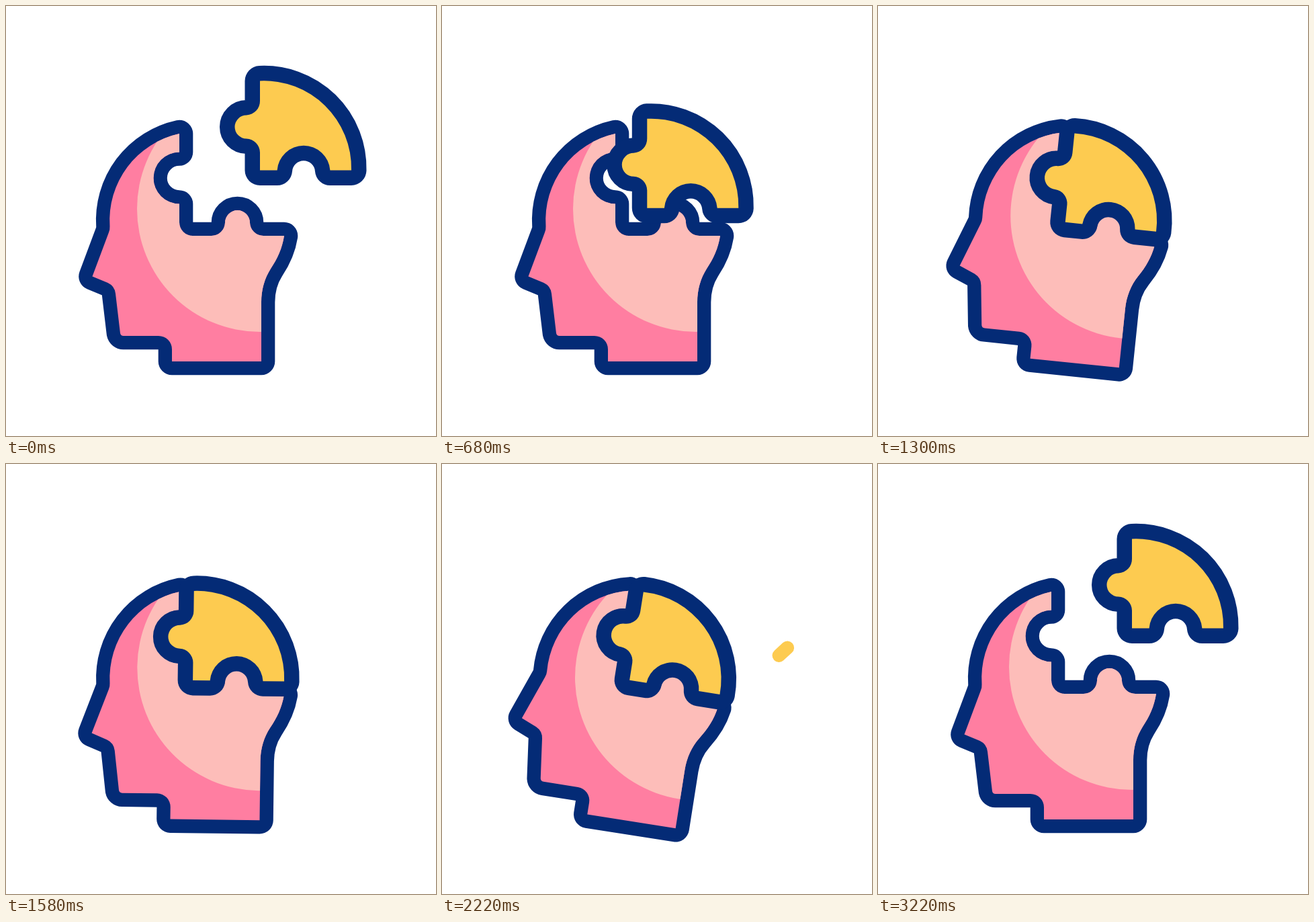
Animation of 640 by 640 pixels, one loop 3.6 s. Source, as an HTML page with a canvas:

```html
<!DOCTYPE html>
<html lang="en">
<head>
<meta charset="utf-8">
<title>Puzzle head</title>
<style>
  html, body { margin: 0; width: 100%; height: 100%; overflow: hidden; background: #fff; }
  canvas { display: block; width: 640px; height: 640px; }
</style>
</head>
<body>
<canvas id="stage" width="640" height="640"></canvas>
<script>
const ctx = document.getElementById('stage').getContext('2d');
const LOOP = 3600;
const NAVY = '#042b76', ROSE = '#ff7ea1', BLUSH = '#fdbdb9', GOLD = '#fdcb50';
const PIVOT = { x: 279, y: 329 };
const DOCK = { x: -100, y: 77.4 };

// Arc commands: turn(r, x, y) runs clockwise, back(r, x, y) counterclockwise.
const turn = (r, x, y) => `A${r} ${r} 0 0 1 ${x} ${y}`;
const back = (r, x, y) => `A${r} ${r} 0 0 0 ${x} ${y}`;

// Paths trace the coloured area; the navy border grows outwards from them.
const head = new Path2D(['M258 190 V217.5', back(38.5, 258, 294.5),
  'V322', back(20, 278, 342), 'H306', back(20, 326, 322.5),
  turn(18.5, 363, 322.5), back(20, 383, 342),
  'H414 C411 361 404 376 394 391 C385 405 380 422 380 441 V529 H247 V511',
  back(20, 227, 491), 'H175', turn(5, 170, 487), 'L163 428',
  back(20, 151.5, 412), 'L128.5 402.5 L153 337', back(20, 154.5, 328),
  turn(132, 258, 190), 'Z'].join(' '));

const piece = new Path2D(['M378 111.5 V141', turn(21, 358, 162.5),
  back(17.5, 358, 197.5), turn(21, 378, 218), 'V244.5 H403.6',
  turn(39.5, 482.4, 244.5), 'H514', back(130, 378, 111.5), 'Z'].join(' '));

const sine = u => 0.5 - 0.5 * Math.cos(Math.PI * u);
const cubicOut = u => 1 - (1 - u) ** 3;

// Bezier easing with control points (x1, 0) and (x2, 1).
const bezier = (x1, x2) => u => {
  let lo = 0, hi = 1;
  for (let i = 0; i < 24; i++) {
    const s = (lo + hi) / 2, r = 1 - s;
    if (3 * r * r * s * x1 + 3 * r * s * s * x2 + s ** 3 < u) lo = s; else hi = s;
  }
  return 3 * (1 - lo) * lo * lo + lo ** 3;
};

// Eased 0..1 progress of t between two times.
const ramp = (t, from, to, ease = sine) =>
  ease(Math.min(1, Math.max(0, (t - from) / (to - from))));

// Degrees: knocked back, swings three times, then settles.
const tilt = t => -6 * ramp(t, 740, 960) + 12.4 * ramp(t, 960, 1350)
  - 12.9 * ramp(t, 1350, 1850) + 15.8 * ramp(t, 1850, 2260)
  - 9.3 * ramp(t, 2260, 3160, bezier(0.4, 0.1));

// Distance of the piece: 0 is docked, 1 is at rest outside.
const gap = t => 1 + 0.19 * ramp(t, 260, 490) - 1.19 * ramp(t, 490, 770)
  + 0.55 * (ramp(t, 770, 960) - ramp(t, 960, 1180))
  + ramp(t, 2250, 2900, bezier(0.25, 0.1));

function shape(path, fill, border) {
  ctx.lineWidth = border * 2;
  ctx.strokeStyle = NAVY;
  ctx.stroke(path);
  ctx.fillStyle = fill;
  ctx.fill(path);
}

function drawHead() {
  shape(head, ROSE, 20.3);
  ctx.save();
  ctx.clip(head);
  ctx.fillStyle = BLUSH;
  ctx.beginPath();
  ctx.arc(378, 302, 183, 0, 2 * Math.PI);
  ctx.fill();
  ctx.restore();
}

// A streak grows from its root, then is wiped away towards its tip.
function drawStreak(t, x, y, length, start) {
  const wipe = start + 290;
  if (t < start || t >= 3200) return;
  const tip = length * ramp(t, start, start + 600, cubicOut);
  const tail = Math.min(tip, length * ramp(t, wipe, 3200));
  ctx.save();
  ctx.translate(x, y);
  ctx.rotate(-42.5 * Math.PI / 180);
  ctx.strokeStyle = GOLD;
  ctx.lineWidth = 20;
  ctx.beginPath();
  ctx.moveTo(tail, 0);
  ctx.lineTo(tip, 0);
  ctx.stroke();
  ctx.restore();
}

function draw(t) {
  ctx.fillStyle = '#fff';
  ctx.fillRect(0, 0, 640, 640);
  ctx.lineJoin = ctx.lineCap = 'round';
  ctx.save();
  ctx.translate(PIVOT.x, PIVOT.y);
  ctx.rotate(tilt(t) * Math.PI / 180);
  ctx.translate(-PIVOT.x, -PIVOT.y);
  drawHead();
  const near = 1 - gap(t);
  ctx.translate(DOCK.x * near, DOCK.y * near);
  shape(piece, GOLD, 22.5);
  ctx.restore();
  drawStreak(t, 501.5, 285, 116, 2190);
  drawStreak(t, 449, 409, 80, 2225);
}

const begin = performance.now();
function tick() {
  draw((performance.now() - begin) % LOOP);
  requestAnimationFrame(tick);
}
tick();
</script>
</body>
</html>
```
